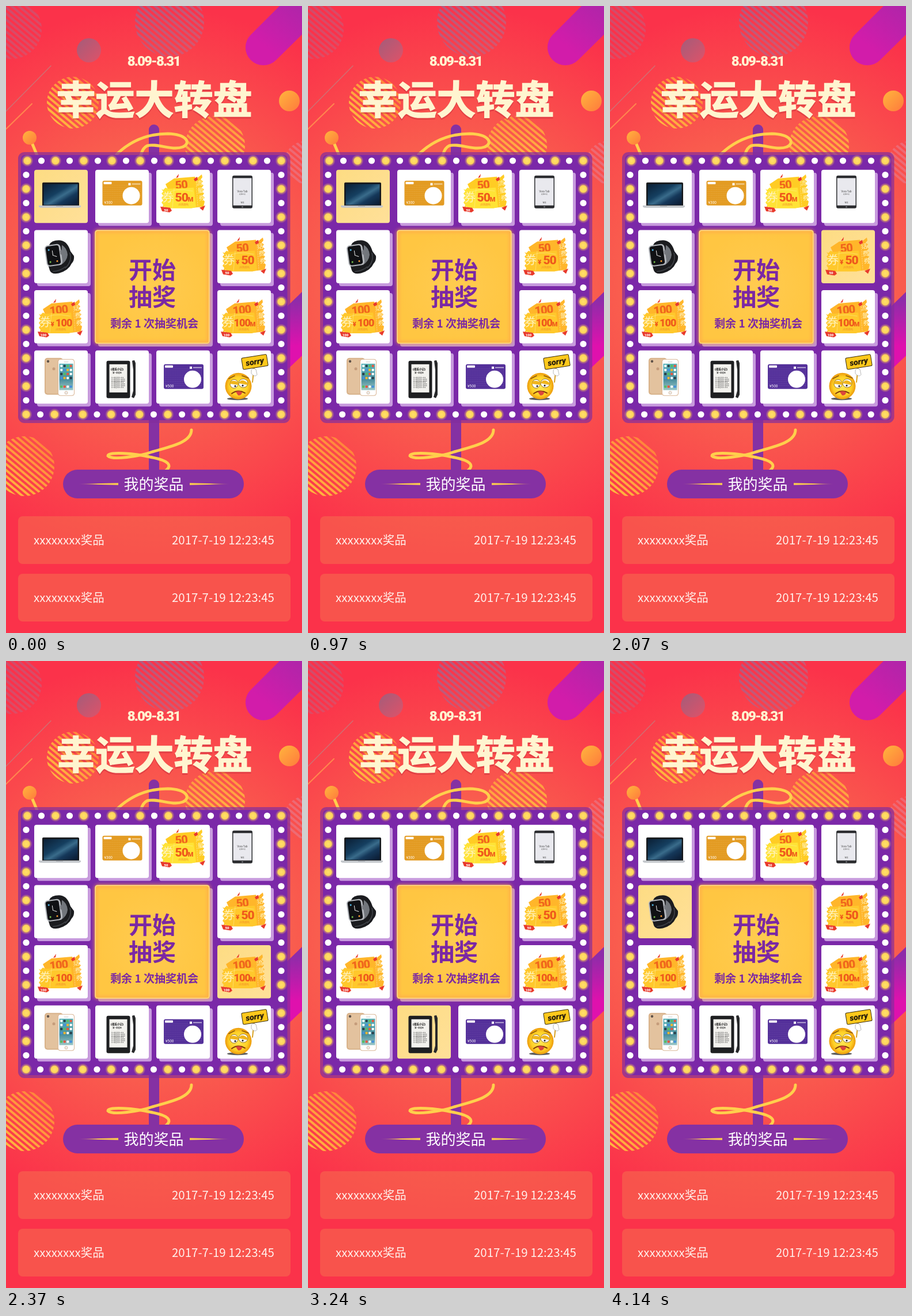
An HTML page for the animation above (4.44 s loop, 514 by 1090 pixels).

```html
<!DOCTYPE html>
<html lang="zh-CN">
<head>
<meta charset="utf-8">
<style>
html, body { margin: 0; height: 100%; overflow: hidden; background: #fb344b; }
svg { display: block; width: 100%; height: 100%; }
text { font-family: "Noto Sans CJK SC", "Noto Sans CJK", "Noto Sans", sans-serif; }
.mid { text-anchor: middle; }
.num { font-family: Roboto, sans-serif; font-weight: 900; }
</style>
</head>
<body>
<svg id="stage" viewBox="0 0 514 1090"></svg>
<script>
const rect = (x, y, w, h, fill, r = 0, more = '') =>
  `<rect x="${x}" y="${y}" width="${w}" height="${h}" rx="${r}" fill="${fill}" ${more}/>`;
const circle = (x, y, r, fill, more = '') => `<circle cx="${x}" cy="${y}" r="${r}" fill="${fill}" ${more}/>`;
const path = (d, fill, more = '') => `<path d="${d}" fill="${fill}" ${more}/>`;
const line = (d, color, w, more = '') => path(d, 'none', `stroke="${color}" stroke-width="${w}" stroke-linecap="round" ${more}`);
const text = (x, y, size, fill, s, more = '') => `<text x="${x}" y="${y}" font-size="${size}" fill="${fill}" ${more}>${s}</text>`;
const at = (x, y, body, turn = 0) => `<g transform="translate(${x} ${y}) rotate(${turn})">${body}</g>`;
const repeat = (n, f) => Array.from({ length: n }, (_, i) => f(i)).join('');
const stops = list => list.map(([o, c, a = 1]) => `<stop offset="${o}" stop-color="${c}" stop-opacity="${a}"/>`).join('');
const linear = (id, x1, y1, x2, y2, ...list) =>
  `<linearGradient id="${id}" x1="${x1}" y1="${y1}" x2="${x2}" y2="${y2}">${stops(list)}</linearGradient>`;
const radial = (id, ...list) => `<radialGradient id="${id}">${stops(list)}</radialGradient>`;

const purple = '#8531a3', cream = '#fff5d0', rope = '#ffcf4c';

const defs = `<defs>
<radialGradient id="bg" gradientUnits="userSpaceOnUse" cx="257" cy="480" r="480">
${stops([[0, '#f87450'], [.5, '#f95d4e'], [1, '#fb324a']])}</radialGradient>
${linear('capsule', 1, 0, 0, 1, [.1, '#a727a9'], [.75, '#d21caa'])}
${linear('band', 0, 0, 0, 1, [.1, '#8e2ca9'], [.65, '#df11ad'])}
${linear('gold', 0, 0, 1, 1, [0, '#ffb53d'], [1, '#ff7a3c'])}
${linear('warm', 0, 0, 0, 1, [0, '#ff8f3f'], [1, '#ffc843'])}
${linear('fire', 1, 0, 0, 1, [.1, '#ff7f3c'], [1, '#ffc43e'])}
${linear('dusk', 0, 0, 1, 1, [0, '#9a607f'], [1, '#dc546c'])}
${linear('mist', 0, 0, 1, 1, [0, '#a4608a'], [1, '#d85a72'])}
${linear('tail', 0, 0, 1, 0, [0, rope, 0], [.5, rope], [1, rope])}
${linear('sky', 0, 0, 1, 1, [0, '#0b1f35'], [.4, '#153f60'], [.55, '#3a6c8b'], [.7, '#15385a'], [1, '#0a1930'])}
${linear('phone', 0, 0, 0, 1, [0, '#5ab4bb'], [.6, '#4a8e9c'], [1, '#9bc7c6'])}
${linear('lit', 0, 0, 1, 1, [0, '#fddc83'], [1, '#ffe099'])}
${radial('bulb', [0, '#ffdf6c'], [.56, '#ffd458'], [.68, '#ffcf55', .5], [1, '#ffc850', 0])}
${radial('ball', [0, '#ffe95a'], [.7, '#ffd026'], [1, '#ec9a0c'])}
${radial('start', [0, '#ffcb50'], [1, '#ffc642'])}
<pattern id="lines" width="8" height="8" patternUnits="userSpaceOnUse" patternTransform="rotate(40)">${rect(0, 0, 8, 4, '#fff')}</pattern>
<mask id="stripes" maskUnits="userSpaceOnUse" x="-60" y="-60" width="640" height="1000">${rect(-60, -60, 640, 1000, 'url(#lines)')}</mask>
<filter id="soft"><feGaussianBlur stdDeviation="3"/></filter>
</defs>`;

const striped = (x, y, r, fill, a = 1) => circle(x, y, r, fill, `mask="url(#stripes)" opacity="${a}"`);

const backdrop =
  rect(0, 0, 514, 1090, 'url(#bg)') +
  striped(10, 40, 52, 'url(#mist)', .6) +
  striped(284, 28, 60, 'url(#mist)', .9) +
  striped(520, 272, 37, '#e8798a', .65) +
  striped(116, 168, 45, 'url(#fire)') +
  striped(363, 243, 52, 'url(#warm)') +
  striped(32, 800, 52, 'url(#fire)') +
  path('M425 50L490 -15H560V4L469 94A31 31 0 0 1 425 50Z', 'url(#capsule)') +
  path('M478 532L514 497V608L478 642Z', 'url(#band)') +
  circle(144, 77, 21, 'url(#dusk)', 'opacity=".9"') +
  circle(492, 165, 18, 'url(#gold)') +
  line('M78 104L0 183', '#cc7375', 1.3) +
  line('M45 170L0 214', '#ff874e', 2) +
  line('M45 238L55 262', rope, 5) + circle(41, 229, 12, 'url(#gold)');

const title = (y, fill, more = '') =>
  text(257.5, y, 68, fill, '幸运大转盘', `class="mid" font-weight="900" stroke="${fill}" stroke-width="1.6" ${more}`);
const header =
  text(256.5, 104, 24, cream, '8.09-8.31', 'class="mid num" letter-spacing="-1.9"') +
  title(191, '#b92438', 'opacity=".35"') + title(188, cream);

const pole =
  rect(248, 206, 18, 80, purple, 9) + rect(248, 715, 18, 100, purple) +
  line('M192 258C222 229 255 222 281 222C314 223 322 238 307 245C288 252 262 238 245 243Q237 247 234 260', rope, 5) +
  line('M322 737C322 760 280 767 254 775C232 783 184 790 177 782C177 774 225 778 250 784C282 790 290 798 277 808', rope, 5);

const tail = path('M0 0L71 -1.7V1.7Z', 'url(#tail)');
const footer =
  rect(99, 806, 314, 50, purple, 25) +
  text(256.5, 841, 26, '#fff', '我的奖品', 'class="mid"') +
  at(124, 831, tail) + at(390, 831, tail, 180) +
  [887, 987].map(y => rect(21, y, 473, 83, '#f6754f', 8, 'opacity=".5"') +
    text(48, y + 49, 20.5, '#fff1ec', 'xxxxxxxx奖品') +
    text(466, y + 49, 20.5, '#fff1ec', '2017-7-19 12:23:45', 'text-anchor="end"')).join('');

// Bulbs around the board; those with index parity `on` glow
const bulb = (x, y, glow) => glow ? circle(x, y, 10.5, 'url(#bulb)') : circle(x, y, 5.6, '#fff');
const bulbs = on => repeat(19, i => {
  const glow = i % 2 === on, y = 269 + 24.5 * i;
  return bulb(37 + 24.5 * i, 269, glow) + bulb(35 + 24.6 * i, 710, glow) +
    (i % 18 ? bulb(35, y, glow) + bulb(478, y, glow) : '');
});

const laptop =
  rect(14, 22, 64, 42, '#17191c', 2) + rect(16.5, 25, 59, 36, 'url(#sky)') +
  path('M8 62H81V64Q80 66 76 66H13Q9 66 8 64Z', '#c3c7cb') + rect(38, 62, 12, 1.5, '#969a9f');

const card = (fill, price, x, y) => at(x, y,
  rect(0, 0, 69, 43, fill, 3) +
  repeat(9, i => line(`M2 ${8 + i * 3.6}H67`, '#ffffff30', .6, 'stroke-dasharray="1 2"')) +
  rect(2, 2, 14, 4, '#fff', 1) + rect(45, 4, 4, 4, '#fff') + rect(51, 5, 15, 1.5, '#ffffffb0') +
  text(3, 40, 6.5, '#fff', '¥' + price) + circle(50, 26, 15, '#fff'));

const ticket = (amount, unit, kind, front, back, x, y) => {
  const red = '#e83a2c', big = amount > 50 ? 18 : 21;
  const label = unit === 'M'
    ? `${amount}<tspan font-size="11">M</tspan>` : `<tspan font-size="11">¥</tspan> ${amount}`;
  return at(x, y,
    path('M15 25L30 15L66 12L68 16L78 8L79 13L76 17L80 20L77 24L81 27L78 31L82 34L79 38L82 41L79 45L83 48L80 52L83 55L81 64L64 66L30 58Z', back) +
    line('M68 16L71 64', '#ffffff80', .7, 'stroke-dasharray="2 2"') +
    at(43, 33, text(0, 0, 20, '#f0661c', amount, 'class="mid num" letter-spacing="-1"'), -6) +
    at(74, 27, [...kind].map((c, i) => text(i, i * 13, 11, '#fff3bf', c, 'class="mid"')).join(''), -5) +
    path('M8 33L11 35L15 31L20 33L64 31L68 65L60 67L18 67L13 64L9 66L11 61L8 57L11 53L8 49L11 45L8 41L11 38Z', front) +
    line('M30 32L27 66M14 43Q30 30 62 37', '#fff1a890', .8) +
    text(19, 55, 20, '#fff3bf', '券', 'class="mid" font-weight="300"') +
    text(47, 55, big, '#ef5a1c', label, 'class="mid num" letter-spacing="-1"') +
    text(46, 62, 4, '#f08a28', '(全国通用)', 'class="mid"') +
    path('M33 14L38 7L37 13ZM64 16L70 12L71 18L66 20Z', red) +
    path('M6 64L23 66L26 71L22 74L9 72Z', red) + path('M74 66L84 62L80 71Z', red) +
    text(16, 72, 6, '#fff', amount, 'class="mid num"'));
};

const tablet =
  rect(26, 10, 35, 57, '#2c2d30', 3) + rect(27.5, 14.5, 32, 47.5, '#e9e9ee') +
  circle(43.5, 64.5, 1.3, '#77787c') +
  text(43.5, 39, 4.5, '#444', 'Vora Tab', 'class="mid"') + text(43.5, 43, 2.8, '#666', '超薄平板', 'class="mid"') +
  text(43.5, 58, 3, '#555', '智能', 'class="mid"');

const watch =
  path('M26 26Q30 17 46 18Q58 20 63 37L69 45Q70 53 65 58Q60 70 43 75Q30 78 27 70L24 60Z', '#1b1c1f') +
  path('M48 26Q57 31 58 43Q57 54 46 61Z', '#72767c') +
  line('M62 40Q66 55 54 66', '#4a4d53', 1.2) + line('M33 72Q46 71 54 64', '#3f4247', 1.5) +
  at(32.5, 44, rect(-13, -18.5, 28, 37, '#b4b7bc', 6) + rect(-11, -16.5, 23, 33, '#101114', 4) +
    line('M0 0V-8M0 0L6 3', '#eee', 1) + circle(-6, -10, 1.5, '#52b6e4') + circle(6, 11, 1.5, '#f49a34') +
    circle(-6, 11, 1.5, '#73c04c') + rect(13, -7, 4, 8, '#777a80', 2), -8);

const phone =
  rect(18, 13, 32, 64, '#d8b28a', 5) + rect(20, 15, 28, 60, '#e3c29e', 4) +
  circle(24, 19, 2.2, '#5e5148') + circle(34, 32, 2.5, '#c59c7b') +
  rect(41, 15, 29, 64, '#d9b796', 4.5) + rect(42, 16, 27, 62, '#fff', 4) + rect(43.5, 23, 24, 46, 'url(#phone)') +
  repeat(20, i => rect(45.2 + i % 4 * 5.5, 25 + (i >> 2) * 7 + (i > 15 ? 8 : 0), 4, 4,
    ['#fff', '#e8563f', '#f5b52f', '#57be60', '#438fdc', '#283d48'][i * 5 % 7 % 6], 1)) +
  circle(55.5, 73.5, 2.5, '#eee', 'stroke="#c9a37e" stroke-width=".7"') + line('M52 20H59', '#bbb', .8);

const reader =
  rect(19.5, 18, 41, 65, '#1e1f21', 3) + rect(24.5, 24, 31, 49, '#f3f2ee') +
  text(38, 34, 4.5, '#111', '《夜航小记》', 'class="mid" font-weight="700"') +
  text(38, 40, 3, '#222', '第一章 起风', 'class="mid" font-weight="700"') +
  repeat(7, i => text(28, 48 + i * 2.9, 2.4, '#333', '灯火渐远风声入夜'.slice(0, i % 3 ? 8 : 7) + '水天')) +
  path('M64 18L68 17L70 22V77L67 83L63 81L66 70V34Z', '#28292b');

const smiley =
  `<ellipse cx="35" cy="84" rx="18" ry="2.5" fill="#000000a0"/>` +
  circle(36.5, 62, 23, 'url(#ball)') +
  line('M64 28L61 55', '#d8a225', 2) +
  at(65, 20, rect(-22, -10, 44, 20, '#ffc91c', 2, 'stroke="#382c0c" stroke-width="1"') +
    text(0, 4.5, 14, '#21190a', 'sorry', 'class="mid num" font-style="italic"'), -9) +
  path('M59 34Q62 30 67 33L69 42Q66 46 62 43L59 40Z', '#fff', 'stroke="#888" stroke-width=".6"') +
  `<g fill="#fff" stroke="#805808" stroke-width=".8"><ellipse cx="29" cy="58" rx="7" ry="7.5"/><ellipse cx="45" cy="57" rx="8" ry="7.5"/></g>` +
  path('M21.5 58Q23 49 36 55L36 60Z', '#f0b51d') + path('M37 57Q42 47 53 57L52 60Z', '#f0b51d') +
  circle(31, 62, 1.6, '#222') + circle(44, 61, 1.6, '#222') +
  line('M20 49L30 44M43 44L54 48', '#8f5b08', 1.6) +
  line('M25 75Q36 67 48 74', '#7e3a0b', 2) + path('M32 72Q39 69 43 73Q42 79 36 78Z', '#dc463c');

// Clockwise from the top left: column, row, picture
const prizes = [
  [0, 0, laptop], [1, 0, card('#e39b22', 300, 12.5, 19)],
  [2, 0, ticket(50, 'M', '流量券', '#ffe336', '#ffcc24', 1, 0)], [3, 0, tablet],
  [3, 1, ticket(50, '', '话费券', '#ffc82c', '#ffb62a', 1, 5)],
  [3, 2, ticket(100, 'M', '流量券', '#ffc82c', '#ffb62a', 0, 8)],
  [3, 3, smiley], [2, 3, card('#54309a', 500, 13, 24)], [1, 3, reader], [0, 3, phone],
  [0, 2, ticket(100, '', '话费券', '#ffc82c', '#ffb62a', 0, 8)], [0, 1, watch]
];

const cells = prizes.map(([c, r, art]) => at(49 + 106 * c, 284.7 + 104.7 * r,
  rect(5, 5, 93, 92.5, '#c79add', 4, 'class="edge"') + rect(0, 0, 93, 92.5, '#fff', 4, 'class="face"') + art)).join('');

const button =
  rect(160, 395, 199, 197, '#c08fd0', 4) +
  rect(154.5, 389.5, 199, 197.5, 'url(#start)', 4) +
  rect(156, 391, 196, 194.5, 'none', 4, 'stroke="#ffa64a" stroke-width="4" filter="url(#soft)"') +
  rect(155.2, 390.2, 197.6, 196, 'none', 4, 'stroke="#ffdc87" stroke-width="1.5"') +
  ['开始', '抽奖'].map((s, i) => text(254, 473.5 + i * 47.5, 41, '#7b28a4', s, 'class="mid" font-weight="700"')).join('') +
  text(257.5, 559, 19, '#7b28a4', '剩余 1 次抽奖机会', 'class="mid" font-weight="700"');

const board =
  rect(21, 254, 472.5, 471, '#842d9d', 11, 'opacity=".7"') + rect(26, 259, 462.5, 461, '#7b28a8', 7) +
  `<g id="even">${bulbs(0)}</g><g id="odd">${bulbs(1)}</g>` + cells + button;

const $ = id => document.getElementById(id);
$('stage').innerHTML = defs + backdrop + header + pole + board + footer;

const faces = document.querySelectorAll('.face'), edges = document.querySelectorAll('.edge');
const hops = [1170, 1470, 1770, 2070, 2340, 2640, 2940, 3240, 3540, 3840, 4140];
const LOOP = 4440;
let start;

function draw(now) {
  start ??= now;
  const t = (now - start) % LOOP;
  const even = t % 970 < 500 || t >= 3870;
  const chosen = hops.filter(h => t >= h).length;
  $('even').style.display = even ? '' : 'none';
  $('odd').style.display = even ? 'none' : '';
  faces.forEach((face, i) => {
    face.setAttribute('fill', i === chosen ? 'url(#lit)' : '#fff');
    edges[i].style.display = i === chosen ? 'none' : '';
  });
  requestAnimationFrame(draw);
}
requestAnimationFrame(draw);
</script>
</body>
</html>
```
